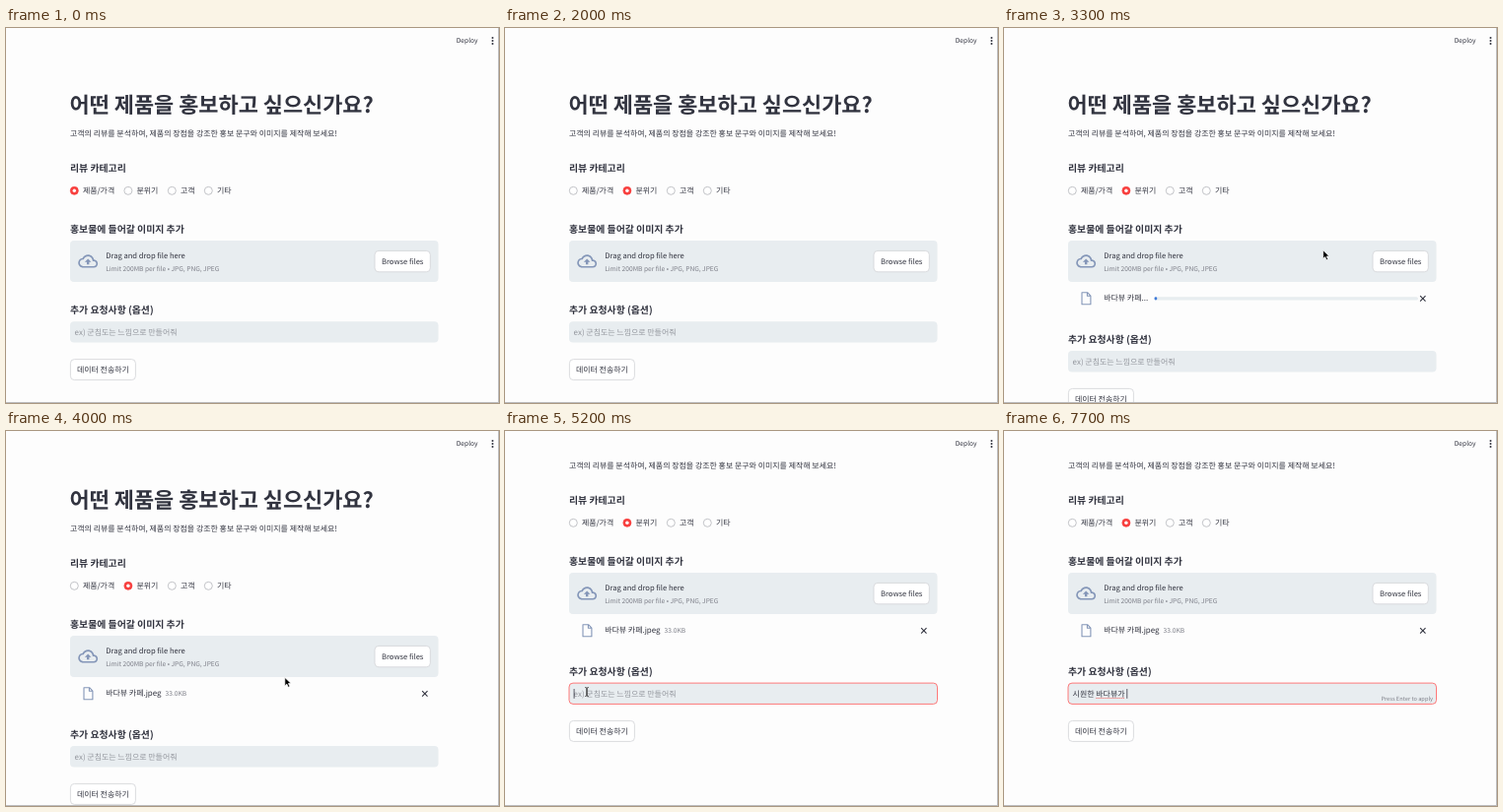
These frames come from a looping animation (500 px wide and 381 px high, 8000 ms). An HTML page:

```html
<!DOCTYPE html>
<html>
<head>
<meta charset="utf-8">
<style>
  html, body { margin: 0; width: 100%; height: 100%; overflow: hidden; background: #fdfdfd; }
  svg { display: block; width: 500px; height: 381px; }
  text {
    font: 7.95px "Noto Sans CJK KR", "Noto Sans CJK", "Noto Sans CJK JP", "Noto Sans", sans-serif;
    fill: #31333f; white-space: pre; text-rendering: geometricPrecision;
  }
  .title { font-size: 21.9px; font-weight: 700; }
  .label { font-size: 9.9px; font-weight: 700; }
  .latin { font-size: 7.6px; }
  .small { font-size: 6.65px; }
  .hint { font-size: 5.7px; }
  .dim { fill: #7d7f88; }
  .panel { fill: #e8edf0; }
  .button { fill: #fff; stroke: #d2d3d7; stroke-width: .8; }
  .icon { fill: #8496b8; }
</style>
</head>
<body>
<svg viewBox="0 0 500 381">
  <rect width="500" height="381" fill="#fdfdfd"/>
  <g id="page">
    <text class="title" x="64.6" y="85.6">어떤 제품을 홍보하고 싶으신가요?</text>
    <text x="65" y="110">고객의 리뷰를 분석하여, 제품의 장점을 강조한 홍보 문구와 이미지를 제작해 보세요!</text>

    <text class="label" x="65" y="146">리뷰 카테고리</text>
    <g id="radios"></g>

    <text class="label" x="65" y="207.6">홍보물에 들어갈 이미지 추가</text>
    <rect class="panel" x="65" y="216" width="373.5" height="42" rx="4"/>
    <path class="icon" transform="translate(73.2 227) scale(.83)" d="M19.35 10.04C18.67 6.59 15.64 4 12 4 9.11 4 6.6 5.64 5.35 8.04 2.34 8.36 0 10.91 0 14c0 3.31 2.69 6 6 6h13c2.76 0 5-2.24 5-5 0-2.64-2.05-4.78-4.65-4.96zM19 18H6c-2.21 0-4-1.79-4-4 0-2.05 1.53-3.76 3.56-3.97l1.07-.11.5-.95C8.08 7.14 9.94 6 12 6c2.62 0 4.88 1.86 5.39 4.43l.3 1.5 1.53.11c1.56.1 2.78 1.41 2.78 2.96 0 1.65-1.35 3-3 3zM8 13h2.55v3h2.9v-3H16l-4-4z"/>
    <text class="latin" x="101.2" y="234">Drag and drop file here</text>
    <text class="small dim" x="101.2" y="247.4">Limit 200MB per file • JPG, PNG, JPEG</text>
    <rect class="button" x="374" y="226.4" width="56.3" height="21.4" rx="4"/>
    <text class="latin" x="402.2" y="239.8" text-anchor="middle">Browse files</text>

    <g id="file">
      <path d="M79 268.7h5.6l3.3 3.4v8.7h-8.9zM84.4 268.9v3.4h3.4" fill="none" stroke="#8496b8" stroke-width="1.1" stroke-linejoin="round"/>
      <text id="fileName" x="101.2" y="277.2"></text>
      <text id="fileSize" class="small dim" x="161.6" y="276.7">33.0KB</text>
      <g id="progress">
        <rect class="panel" x="152.5" y="273.3" width="267.5" height="3.2" rx="1.6"/>
        <rect id="bar" x="152.5" y="273.3" height="3.2" rx="1.4" fill="#3f7bd9"/>
      </g>
      <path d="M422.1 272.2l5.4 5.4m0-5.4l-5.4 5.4" stroke="#31333f" stroke-width="1.1"/>
    </g>

    <g id="lower">
      <text class="label" x="65" y="290">추가 요청사항 (옵션)</text>
      <rect id="field" class="panel" x="65" y="298.3" width="373.5" height="21.3" rx="4"/>
      <text id="placeholder" class="dim" x="69.6" y="312" style="fill:#92959c">ex) 군침도는 느낌으로 만들어줘</text>
      <text id="typed" x="69.6" y="312"></text>
      <line id="underline" y1="313.6" y2="313.6" stroke-width=".8"/>
      <line id="caret" y1="304.2" y2="314" stroke="#31333f" stroke-width=".8"/>
      <text id="hint" class="hint dim" x="435" y="316.4" text-anchor="end">Press Enter to apply</text>
      <rect class="button" x="65.4" y="336.6" width="66" height="21" rx="4"/>
      <text x="98.4" y="350" text-anchor="middle">데이터 전송하기</text>
    </g>
  </g>

  <rect width="499" height="25" fill="#fdfdfd"/>
  <text class="small" x="456.8" y="15.4">Deploy</text>
  <g fill="#31333f">
    <circle cx="493.5" cy="9.9" r="1"/><circle cx="493.5" cy="13" r="1"/><circle cx="493.5" cy="16.1" r="1"/>
  </g>
  <path d="M499.5 0V381M0 380.5H500" stroke="#bcbcbe"/>

  <path id="arrow" d="M0 0v8.6l2-1.9 1.4 3.2 1.6-.7-1.4-3.1h2.7z" fill="#000" stroke="#fff" stroke-width=".7"/>
  <path id="beam" d="M-1.8-4.5q1.8 0 1.8 1.2v6.6q0 1.2-1.8 1.2M1.8-4.5q-1.8 0-1.8 1.2v6.6q0 1.2 1.8 1.2" fill="none" stroke="#222" stroke-width=".8"/>
</svg>

<script>
const LOOP = 8000, TICK = 100;
const SELECT = 1000, UPLOAD = 3300, UPLOADED = 3600, FOCUS = 5000, TYPE = 5500, SPELLCHECK = 7700;

// pointer strokes: lists of [time, x, y]; hidden between strokes
const strokes = [
  [[100, 466, 244], [350, 290, 165], [600, 121, 163], [1000, 121, 163], [1200, 474, 276]],
  [[2500, 494, 135], [3300, 323.6, 225.8], [3500, 300, 241], [3700, 282.8, 250.4],
   [4400, 282.8, 250.4], [4800, 83, 265], [5400, 83, 265]]
];
const scrolls = [[0, 0], [4000, 8], [4100, 46], [4200, 72]];
// [time, text, composing syllables at the end]
const typing = [
  [0, "", 0],
  [5500, "ㅅ", 1], [5600, "시", 1], [5700, "싱", 1], [5800, "시우", 1], [5900, "시워", 1],
  [6100, "시원", 1], [6200, "시원하", 1], [6300, "시원한", 1], [6400, "시원한 ㅂ", 1], [6500, "시원한 바", 1],
  [6700, "시원한 받", 1], [6900, "시원한 바다", 1],
  [7100, "시원한 바다ㅂ", 1], [7200, "시원한 바다뷰", 1], [7300, "시원한 바다뷱", 1], [7400, "시원한 바다뷰가", 1],
  [7600, "시원한 바다뷰가 ", 0]
];
const options = [[69.3, "제품/가격"], [123.9, "분위기"], [168.3, "고객"], [205.3, "기타"]];

const $ = id => document.getElementById(id);
const set = (id, attrs) => { for (const k in attrs) $(id).setAttribute(k, attrs[k]); };
const show = (id, on) => set(id, { visibility: on ? "visible" : "hidden" });
const latest = (table, t) => table.filter(row => row[0] <= t).pop();

$("radios").innerHTML = options.map(([x, name]) =>
  `<circle cx="${x}" cy="165.3" r="4"/><circle cx="${x}" cy="165.3" r="1.7" fill="#fff"/>
   <text x="${x + 8.6}" y="168.2">${name}</text>`).join("");
const rings = [...$("radios").querySelectorAll("circle:nth-of-type(odd)")];

function pointerAt(t) {
  const keys = strokes.find(s => t >= s[0][0] && t <= s[s.length - 1][0]);
  if (!keys) return null;
  const i = Math.max(1, keys.findIndex(k => k[0] >= t));
  const [a, b] = [keys[i - 1], keys[i]];
  const p = (t - a[0]) / (b[0] - a[0]);
  return [a[1] + (b[1] - a[1]) * p, a[2] + (b[2] - a[2]) * p];
}

function drawPointer(t) {
  const at = pointerAt(t), overField = t >= 4800;
  show("arrow", at && !overField);
  show("beam", at && overField);
  if (at) set(overField ? "beam" : "arrow", { transform: `translate(${at})` });
}

function drawFile(t) {
  const done = t >= UPLOADED;
  $("file").style.display = t >= UPLOAD ? "" : "none";
  $("progress").style.display = done ? "none" : "";
  $("fileSize").style.display = done ? "" : "none";
  $("fileName").textContent = done ? "바다뷰 카페.jpeg" : "바다뷰 카페...";
  set("bar", { width: 2.8 + Math.max(0, t - UPLOAD) / 200 * 264.7 });
  set("lower", { transform: `translate(0 ${t >= UPLOAD ? 29.8 : 0})` });
}

function drawField(t) {
  const focused = t >= FOCUS, active = t >= TYPE;
  const [, text, composing] = latest(typing, t);
  const node = $("typed"), left = 69.6;
  const value = text.replace(/ /g, "\u00a0");
  if (node.textContent !== value) node.textContent = value;
  const width = n => n > 0 ? node.getSubStringLength(0, n) : 0;
  const end = left + width(value.length);

  set("field", { stroke: focused ? "#ff6b6b" : "none", "stroke-width": .9 });
  show("placeholder", !active);
  show("hint", active);
  show("caret", focused);
  set("caret", { x1: end + .5, x2: end + .5 });

  const misspelt = t >= SPELLCHECK;
  const from = misspelt ? 4 : value.length - composing;
  const to = misspelt ? 8 : value.length;
  show("underline", active && (composing || misspelt));
  set("underline", {
    x1: left + width(from), x2: left + width(to),
    stroke: misspelt ? "#f0605c" : "#31333f",
    "stroke-dasharray": misspelt ? "1.4 .7" : "none"
  });
}

function draw(t) {
  const chosen = t >= SELECT ? 1 : 0;
  rings.forEach((ring, i) => {
    ring.setAttribute("fill", i === chosen ? "#f8403f" : "#fff");
    ring.setAttribute("stroke", i === chosen ? "#f8403f" : "#b4b5ba");
    ring.setAttribute("stroke-width", .8);
  });
  set("page", { transform: `translate(0 ${-latest(scrolls, t)[1]})` });
  drawFile(t);
  drawField(t);
  drawPointer(t);
}

const start = performance.now();
function frame() {
  const t = (performance.now() - start) % LOOP;
  draw(Math.floor(t / TICK) * TICK);
  requestAnimationFrame(frame);
}
frame();
</script>
</body>
</html>
```
